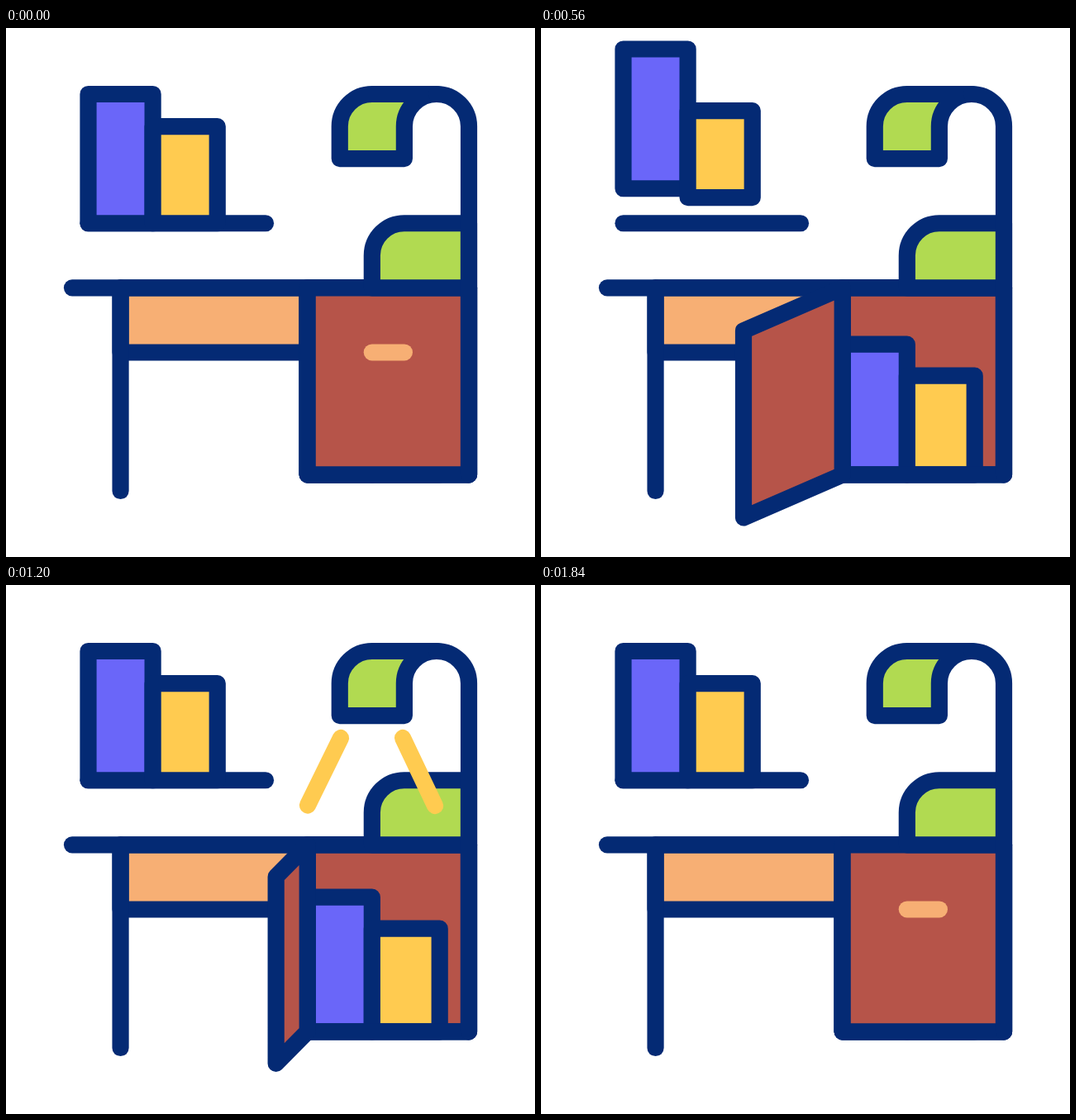
Animation of 640x640 px, one loop 2 s. Source, as an HTML page with a canvas:

```html
<!DOCTYPE html>
<html lang="en">
<head>
<meta charset="utf-8">
<title>Desk</title>
<style>
html, body { margin: 0; width: 100%; height: 100%; overflow: hidden; background: #fff; }
canvas { display: block; width: 640px; height: 640px; }
</style>
</head>
<body>
<canvas id="stage" width="640" height="640"></canvas>
<script>
const ctx = document.getElementById('stage').getContext('2d');
const LOOP = 2000, STEP = 40, MOVE = 240, BEAT = MOVE / 2;
const NAVY = '#042a74', PURPLE = '#6a66f9', YELLOW = '#ffcb50';
const GREEN = '#b1da51', BROWN = '#b65449', PEACH = '#f7af74';

// Layout grid: columns counted left from the lamp pole, rows down from the top.
const G = 39.06, POLE = 560, LEFT = 99.5, FLOOR = 540.4;
const col = n => POLE - G * n;
const row = n => 80 + G * n;
const SHELF = row(4), TOP = row(6), DRAWER = row(8), HINGE = col(5);

const clamp = u => Math.min(1, Math.max(0, u));
const smooth = u => u * u * (3 - 2 * u);
const ramp = (t, at) => clamp((t - at) / MOVE);
const bump = (t, peak) => smooth(clamp(1 - Math.abs(t - peak) / BEAT));

function shape(d, fill, stroke = NAVY) {
  const path = new Path2D(d);
  if (fill) {
    ctx.fillStyle = fill;
    ctx.fill(path);
  }
  ctx.strokeStyle = stroke;
  ctx.stroke(path);
}

const line = (x0, y0, x1, y1, color) => shape(`M${x0} ${y0}L${x1} ${y1}`, null, color);
const box = (l, t, r, b, fill) => shape(`M${l} ${t}H${r}V${b}H${l}Z`, fill);

// A book squashes, then hops; stretch is how much taller it is in the air.
function hopper(t, n, apex, stretch, fill) {
  const lift = bump(t, apex), squash = 15.5 * bump(t, apex - BEAT);
  const x = LEFT + 2 * G * n, hop = 42 * lift;
  return land => box(x, row(n) + squash + land - hop - stretch * lift, x + 2 * G, SHELF - hop, fill);
}

function shelf(t) {
  line(LEFT, SHELF, 314, SHELF);
  hopper(t, 0, 560, 12.5, PURPLE)(15.5 * bump(t, 800));
  hopper(t, 1, 600, -11, YELLOW)(0);
}

function desk() {
  box(LEFT + G, TOP, HINGE, DRAWER, PEACH);
  line(LEFT + G, TOP, LEFT + G, POLE);
  line(80, TOP, POLE, TOP);
}

function cabinet(t) {
  box(HINGE, TOP, POLE, FLOOR, BROWN);
  const y = 382.6 + 15 * bump(t, 280) - 5 * bump(t, 1200);
  box(HINGE, y, col(3), FLOOR, PURPLE);
  box(col(3), y + G - 1, 524.7, FLOOR, YELLOW);
  box(HINGE, TOP, POLE, FLOOR);
}

function door(t) {
  const open = smooth(ramp(t, 120)) - smooth(ramp(t, 1120));
  const w = 5 * G - 315 * open, dy = 52 * open;
  shape(`M${HINGE} ${TOP}l${w} ${dy}V${FLOOR + dy}L${HINGE} ${FLOOR}Z`, BROWN);
  if (w <= 0) return;
  ctx.save();
  ctx.transform(w / (5 * G), dy / (5 * G), 0, 1, HINGE, 0);
  line(2 * G, DRAWER, 3 * G, DRAWER, PEACH);
  ctx.restore();
}

function lamp(t) {
  const arc = `A${G} ${G} 0 0`;
  shape(`M${col(3)} ${TOP}V${row(5)}${arc} 1 ${col(2)} ${SHELF}H${POLE}V${TOP}Z`, GREEN);
  shape(`M${col(4)} ${row(2)}V${row(1)}${arc} 1 ${col(3)} 80H${col(1)}` +
    `${arc} 0 ${col(2)} ${row(1)}V${row(2)}Z`, GREEN);
  shape(`M${col(1)} 80${arc} 1 ${POLE} ${row(1)}V${FLOOR}`);
  ctx.globalAlpha = ramp(t, 720) - ramp(t, 1600);
  line(405, 185, 365, 266.5, YELLOW);
  line(480, 185, 519, 267, YELLOW);
  ctx.globalAlpha = 1;
}

function draw(t) {
  ctx.fillStyle = '#fff';
  ctx.fillRect(0, 0, 640, 640);
  ctx.lineWidth = 20.2;
  ctx.lineCap = ctx.lineJoin = 'round';
  shelf(t);
  desk();
  cabinet(t);
  door(t);
  lamp(t);
}

const start = performance.now();
function tick() {
  const t = (performance.now() - start) % LOOP;
  draw(Math.floor(t / STEP) * STEP);
  requestAnimationFrame(tick);
}
tick();
</script>
</body>
</html>
```
